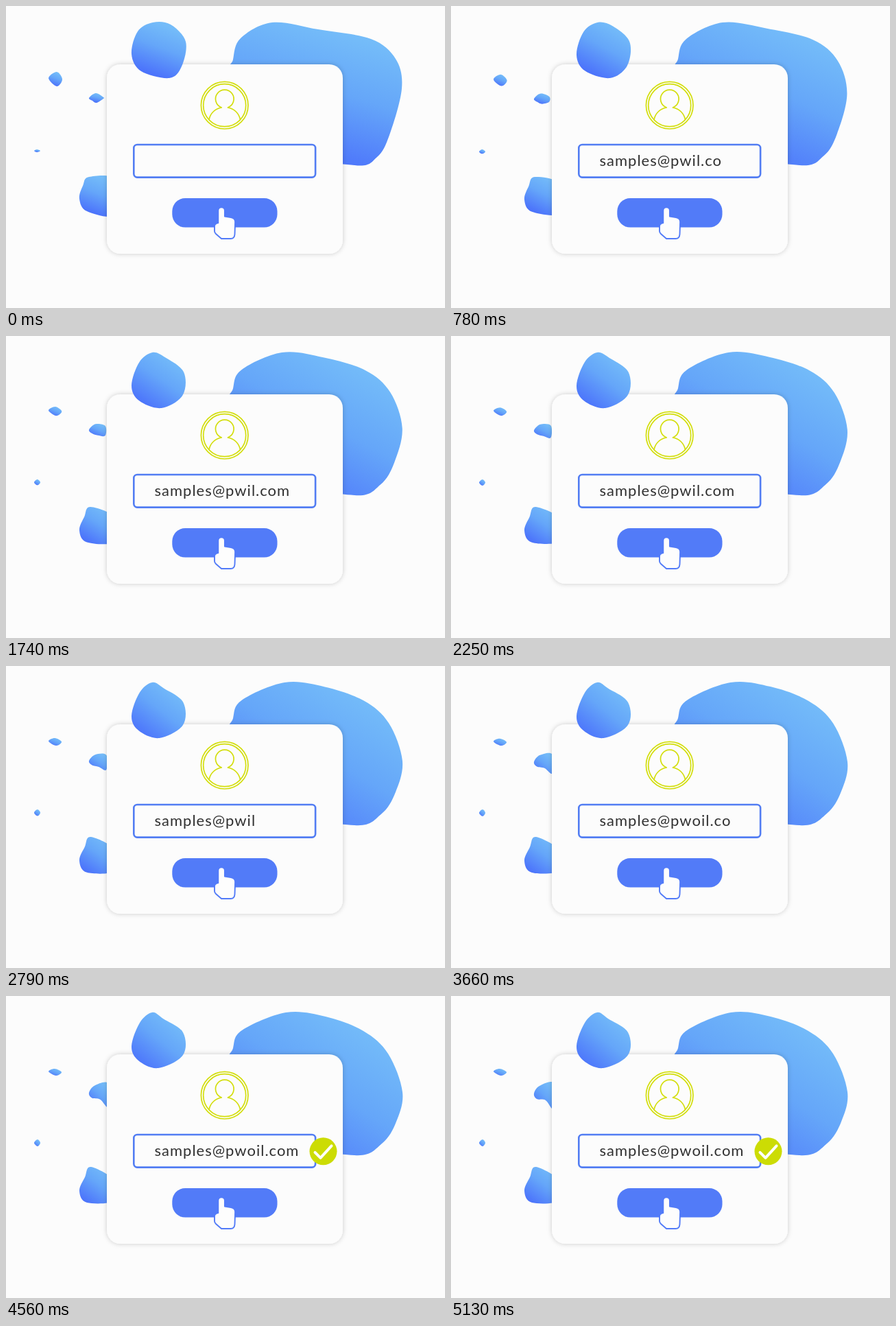
Animation, 640 px wide and 440 px high, one loop 5160 ms. Source, as an HTML page:

```html
<!DOCTYPE html>
<html lang="en">
<head>
<meta charset="utf-8">
<title>Sign-in form</title>
<style>
html, body { margin: 0; width: 100%; height: 100%; overflow: hidden; background: #fcfcfc; }
svg { display: block; width: 640px; height: 440px; }
text { font: 22px Lato, "Open Sans", sans-serif; letter-spacing: 1px; fill: #303030; }
.blob { fill: url(#sky); }
.line { fill: none; stroke-linecap: round; stroke-linejoin: round; }
</style>
</head>
<body>
<svg viewBox="0 0 640 440">
  <defs>
    <linearGradient id="sky" x1=".85" y1=".15" y2=".98">
      <stop offset="0" stop-color="#74bcf9"/>
      <stop offset=".45" stop-color="#65a6f9"/>
      <stop offset="1" stop-color="#4c74fb"/>
    </linearGradient>
    <filter id="shadow" x="-10%" y="-10%" width="120%" height="120%">
      <feDropShadow dx="0" dy="0" stdDeviation="3.6" flood-opacity=".2"/>
    </filter>
  </defs>
  <g id="back"></g>
  <rect x="147" y="85" width="344" height="276" rx="20" fill="#fcfcfc" filter="url(#shadow)"/>
  <g id="front"></g>
  <g class="line" stroke="#d3de0c" stroke-width="1.7">
    <circle cx="318.7" cy="144.7" r="34.3"/>
    <circle cx="318.7" cy="144.7" r="31"/>
    <path d="M296 165.500C298 156 305 149.500 314.300 148A13.300 13.300 0 1 1 323.300 148C332.500 149.500 339.500 156 341.500 165.500"/>
  </g>
  <rect x="186.3" y="202" width="264.8" height="47.6" rx="5" fill="#fcfcfc" stroke="#527df3" stroke-width="2.6"/>
  <text id="mail" x="216.5" y="232.5"></text>
  <rect x="242.3" y="280" width="153.2" height="42.6" rx="19" fill="#527bf8"/>
  <path class="line" style="fill:#fdfdfd" stroke="#527bf8" stroke-width="1.9"
    d="M309.300 298a4.800 4.800 0 0 1 9.600 0v8.500l9 1.500q6.200 1 6.200 6.500l-.6 18q-.4 6.500-6 6.500h-13.500l-8-7q-2-2-2-4v-7q0-4 5.300-5z"/>
  <g id="check">
    <circle r="20" fill="#ccdc04"/>
    <path class="line" d="M-12 1.500L-4 9.500L12-8" stroke="#fff" stroke-width="4"/>
  </g>
</svg>
<script>
const LOOP = 5160, STEP = 30;
const $ = id => document.getElementById(id);
const clamp = x => Math.max(0, Math.min(1, x));
const easeOut = (x, power = 3) => 1 - (1 - clamp(x)) ** power;
const mix = (a, b, k) => a + (b - a) * k;

// Each blob eases from one outline to another; power 1 is a steady pace.
function blob(layer, from, to, power) {
  const path = document.createElementNS('http://www.w3.org/2000/svg', 'path');
  path.setAttribute('class', 'blob');
  $(layer).append(path);
  const [a, b] = [from, to].map(s => s.split(' ').map(p => p.split(',').map(Number)));
  return x => {
    const k = easeOut(x, power);
    path.setAttribute('d', smooth(a.map((p, i) => p.map((v, j) => mix(v, b[i][j], k)))));
  };
}

// Closed Catmull-Rom curve as cubic Béziers.
function smooth(points) {
  const n = points.length, at = i => points[(i + n) % n];
  const handle = (i, dir) => at(i).map((v, j) => v + dir * (at(i + 1)[j] - at(i - 1)[j]) / 6);
  return 'M' + points[0] + points.map((p, i) =>
    'C' + [handle(i, 1), handle(i + 1, -1), at(i + 1)].join(' ')).join('') + 'Z';
}

const blobs = [
  blob('back',
    '331,78 342,47 388,24 455,34 532,48 568,77 577,120 559,188 541,220 508,232 400,205 330,105',
    '331,76 344,50 408,24 466,30 521,51 557,84 578,140 569,183 548,215 508,232 400,205 330,105'),
  blob('front',
    '214,24 240,27 262,52 256,88 238,105 197,95 183,70 192,37',
    '213,24 229,33 258,53 258,86 222,105 193,94 183,73 195,39'),
  blob('back',
    '121,249 160,253 160,304 118,299 107,281 112,262',
    '124,249 160,270 160,298 118,301 107,284 115,264'),
  blob('back',
    '121,134 131,127 142,133 142,135 132,141 126,138',
    '121,142 129,131 150,127 150,165 138,152 125,150', 1),
  blob('back', '62,105 74,96 82,107 74,117', '62,110 71,106 81,111 73,116'),
  blob('back', '41,211 45,209 50,211 45,213', '41,214 46,209 50,214 46,219')
];

const typo = 'samples@pwil.com', corrected = 'samples@pwoil.com', KEPT = 10;
function typed(t) {
  if (t < 2350) return typo.slice(0, Math.max(0, Math.floor((t - 30) / 50)));
  if (t < 3020) return typo.slice(0, Math.max(KEPT, 16 - Math.floor((t - 2350) / 100)));
  return corrected.slice(0, KEPT + Math.floor((t - 3020) / 100));
}

function draw(now) {
  const t = Math.floor(now % LOOP / STEP) * STEP;
  for (const morph of blobs) morph(t / LOOP);
  $('sky').setAttribute('x2', mix(.55, .2, easeOut(t / LOOP)));
  $('mail').textContent = typed(t);
  $('check').setAttribute('transform',
    `translate(462.5 226.3) scale(${easeOut((t - 3960) / 240)})`);
  requestAnimationFrame(draw);
}
draw(0);
</script>
</body>
</html>
```
